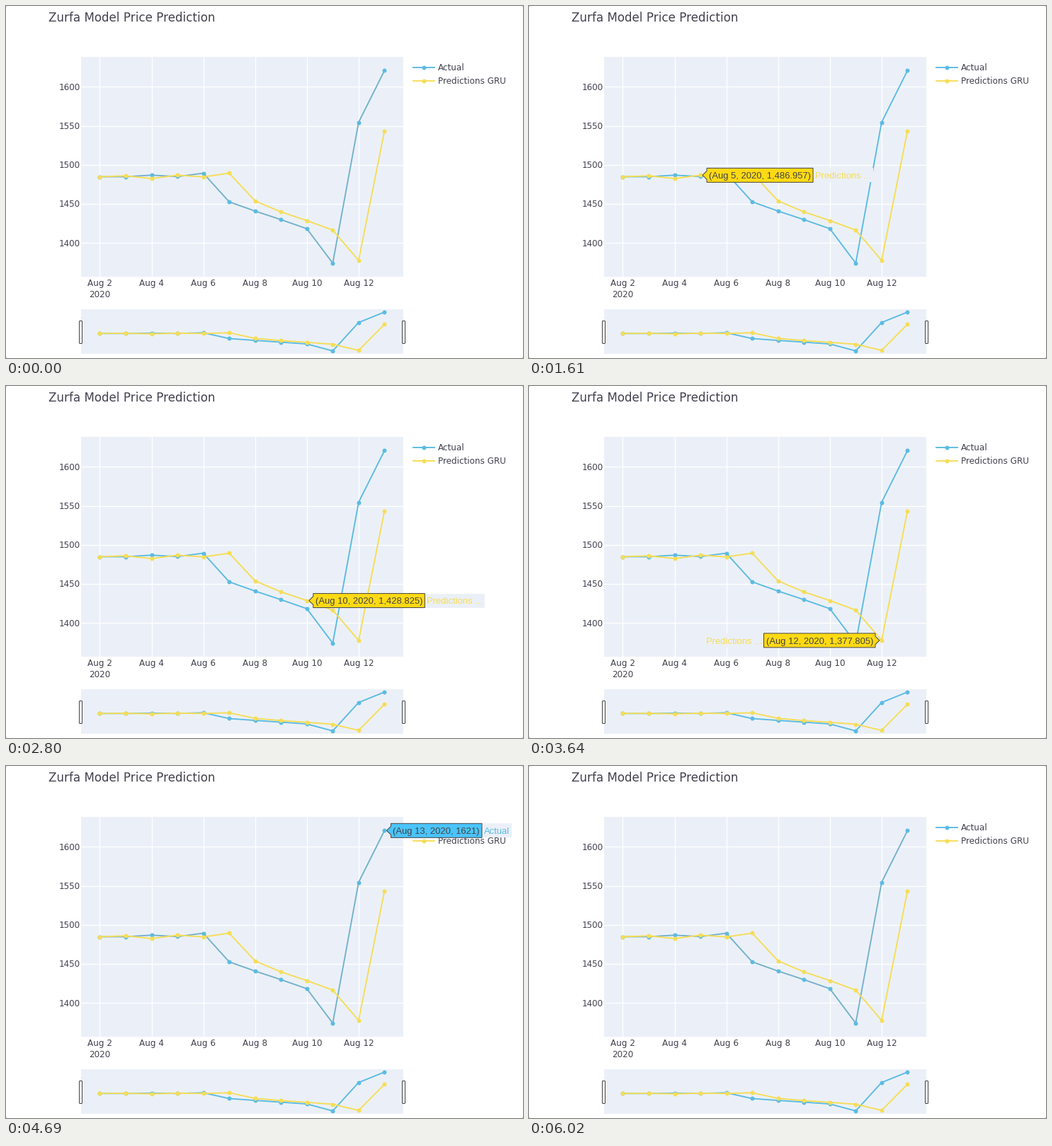
Recreate the animation shown at these times as a matplotlib script. Size 730x498 px, loop 6.23 s.

```python
import matplotlib.pyplot as plt
from matplotlib.animation import FuncAnimation
from matplotlib.patches import FancyBboxPatch, Polygon, Rectangle

W, H, DPI = 730, 498, 100
PX = 72 / DPI
FRAMES, STEP = 89, 70

PANEL, INK, EDGE = "#ebf0f8", "#42424f", "#444444"
BLUE, BLUE_SOFT, SKY = "#5cbbe2", "#74b1cb", "#4ac4fc"
YELLOW, GOLD = "#f6dd56", "#ffda14"

ACTUAL = [1485, 1485, 1487, 1485.2, 1489.5, 1452.8,
          1441, 1430, 1418.4, 1374.3, 1554.7, 1621]
PREDICTED = [1485.012, 1486.124, 1482.637, 1486.957, 1484.752, 1489.548,
             1454.016, 1439.937, 1428.825, 1416.613, 1377.805, 1543.821]
DAYS = range(2, 14)

# (start in ms, day, series) of each hover state
HOVERS = [(0, None, None), (700, 4, "p"), (1330, 5, "p"), (1680, 6, "p"),
          (1890, 7, "p"), (2100, 8, "p"), (2310, 9, "p"), (2590, 10, "p"),
          (2870, 11, "p"), (3150, 12, "p"), (3850, 13, "p"),
          (4270, 13, "a"), (5180, None, None)]


def day_x(day):
    return 132.4 + (day - 2) * 36.55


def main_y(value):
    return 335.4 - (value - 1400) * 1.1045


def slider_y(value):
    return 433 + (1621 - value) * 0.2229


fig = plt.figure(figsize=(W / DPI, H / DPI), dpi=DPI, facecolor="#9a9a9a")
ax = fig.add_axes([0, 0, 1, 1])
ax.set_xlim(0, W)
ax.set_ylim(H, 0)
ax.axis("off")


def box(x0, y0, x1, y1, color, edge="none", z=1):
    return ax.add_patch(Rectangle((x0, y0), x1 - x0, y1 - y0, facecolor=color,
                                  edgecolor=edge, linewidth=PX, zorder=z))


def label(x, y, text, size=12, color=INK, ha="left", font="DejaVu Sans", z=6):
    return ax.text(x, y, text, fontsize=size * PX, color=color, ha=ha,
                   va="baseline", family=font, zorder=z)


def trace(xs, ys, color, z):
    line, = ax.plot(xs, ys, color=color, lw=1.9 * PX, marker="o", ms=6 * PX,
                    mec="none", mfc=color, zorder=z)
    return line


# Window with slightly rounded corners
ax.add_patch(FancyBboxPatch((2, 2), W - 4, H - 4, facecolor="white",
                            boxstyle="round,pad=0,rounding_size=2",
                            mutation_aspect=1, edgecolor="none", zorder=0))
ax.patches[-1].set_boxstyle("round", pad=2, rounding_size=2)

label(60, 22, "Zurfa Model Price Prediction", 16.8)
box(106, 72, 561, 383, PANEL)
box(106, 429, 561, 491.5, PANEL)

for value in range(1400, 1601, 50):
    y = main_y(value)
    ax.plot([106, 561], [y, y], color="white", lw=1.3 * PX, zorder=2)
    label(104.8, y + 4.3, str(value), ha="right")
for day in range(2, 13, 2):
    x = day_x(day)
    ax.plot([x, x], [72, 383], color="white", lw=1.3 * PX, zorder=2)
    label(x, 396, f"Aug {day}", ha="center")
label(day_x(2), 412, "2020", ha="center")

xs = [day_x(d) for d in DAYS]
actual_line = trace(xs, [main_y(v) for v in ACTUAL], BLUE, 3)
trace(xs, [main_y(v) for v in PREDICTED], YELLOW, 4)
trace(xs, [slider_y(v) for v in ACTUAL], BLUE, 3)
trace(xs, [slider_y(v) for v in PREDICTED], YELLOW, 4)

for x in (105.5, 561.5):
    ax.add_patch(FancyBboxPatch((x - 2, 445.5), 4, 32, facecolor="white",
                                boxstyle="round,pad=0,rounding_size=1",
                                edgecolor=EDGE, linewidth=PX, zorder=5))

for name, y, color in (("Actual", 87, BLUE), ("Predictions GRU", 105.8, YELLOW)):
    ax.plot([575, 605], [y, y], color=color, lw=1.9 * PX, zorder=4)
    ax.plot([590], [y], "o", color=color, ms=6 * PX, mec="none", zorder=4)
    label(610, y + 4.3, name)

# Hover label, re-laid out for each point
name_box = box(0, 0, 1, 1, PANEL, z=8)
bubble = ax.add_patch(Polygon([(0, 0), (1, 0), (1, 1)], edgecolor=EDGE,
                              linewidth=PX, zorder=9))
value_text = label(0, 0, "", 13, EDGE, font="Liberation Sans", z=10)
name_text = label(0, 0, "", 13, font="Liberation Sans", z=10)
hover_parts = (name_box, bubble, value_text, name_text)


def text_width(artist):
    return artist.get_window_extent().width * DPI / fig.dpi


def place_hover(day, series):
    predicted = series == "p"
    value = (PREDICTED if predicted else ACTUAL)[day - 2]
    shown = f"{value:,.3f}" if predicted else f"{value:.0f}"
    value_text.set_text(f"(Aug {day}, 2020, {shown})")
    name_text.set_text("Predictions ..." if predicted else "Actual")
    name_text.set_color(YELLOW if predicted else BLUE)
    bubble.set_facecolor(GOLD if predicted else SKY)

    x, y = day_x(day), main_y(value)
    body_w = text_width(value_text) + 6
    name_w = text_width(name_text) + 6
    side = 1 if x + 9 + body_w + name_w < W else -1
    tip, near = x + 3 * side, x + 9 * side
    far = near + side * body_w
    bubble.set_xy([(tip, y), (near, y - 6), (near, y - 10), (far, y - 10),
                   (far, y + 10), (near, y + 10), (near, y + 6)])
    value_text.set_position((min(near, far) + 3, y + 4.7))
    name_left = far if side > 0 else far - name_w
    name_box.set_bounds(name_left, y - 10, name_w, 20)
    name_text.set_position((name_left + 3, y + 4.7))


def update(frame):
    t = frame * STEP
    _, day, series = [h for h in HOVERS if h[0] <= t][-1]
    for part in hover_parts:
        part.set_visible(day is not None)
    if day is not None:
        place_hover(day, series)
    actual_line.set_color(BLUE if 700 <= t < 4270 else BLUE_SOFT)
    return (actual_line, *hover_parts)


anim = FuncAnimation(fig, update, frames=FRAMES, interval=STEP,
                     repeat=True, repeat_delay=0, blit=False)
plt.show()
```
